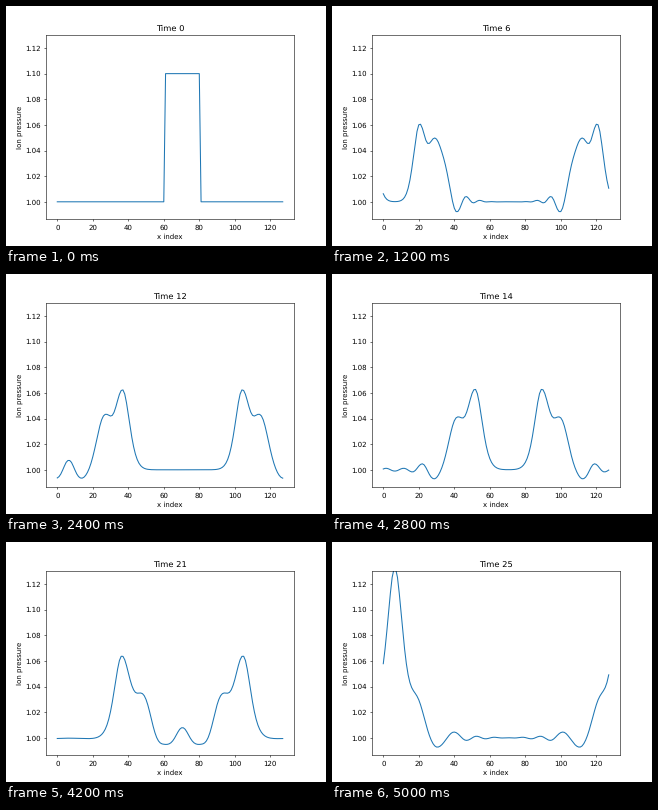
A matplotlib script that plays this animation: 320x240 px, repeating every 5.2 s.

```python
import numpy as np
import matplotlib.pyplot as plt
from matplotlib.animation import FuncAnimation

CELLS = 128
FRAMES = 26
STEPS = 20             # time steps per frame
GAMMA = 5 / 3
SOUND = 7.44           # sound speed, cells per frame
SCALE = SOUND / np.sqrt(GAMMA)
DAMPING = 0.6          # strength of the Lax flux


def right(f):
    return np.roll(f, -1)


def left(f):
    return np.roll(f, 1)


def slope(f):
    """Monotonised-central limited slope."""
    back, ahead = f - left(f), right(f) - f
    size = np.minimum(2 * np.minimum(abs(back), abs(ahead)),
                      0.5 * abs(back + ahead))
    return np.where(back * ahead > 0, np.sign(back) * size, 0)


def gradient(f):
    return 0.5 * (right(f) - left(f))


def advect(f, v, wave):
    """Divergence of f*v with a Lax flux at the cell faces."""
    half = 0.5 * slope(f)
    v_face = 0.5 * (v + right(v))
    w_face = np.maximum(wave, right(wave))
    flux = 0.5 * ((f + half) * (v_face + w_face)
                  + right(f - half) * (v_face - w_face))
    return flux - left(flux)


def rates(state):
    n, m, p = state
    v = m / n
    wave = DAMPING * np.sqrt(p / n)
    return -SCALE * np.array([
        advect(n, v, wave),
        advect(m, v, wave) + gradient(p),
        advect(p, v, wave) + (GAMMA - 1) * p * gradient(v),
    ])


def advance(state, dt):
    k1 = rates(state)
    k2 = rates(state + dt / 2 * k1)
    k3 = rates(state + dt / 2 * k2)
    k4 = rates(state + dt * k3)
    return state + dt / 6 * (k1 + 2 * k2 + 2 * k3 + k4)


def simulate():
    x = np.arange(CELLS)
    pressure = np.where((x > 60) & (x <= 80), 1.1, 1.0)
    state = np.array([np.ones(CELLS), np.zeros(CELLS), pressure])
    history = [pressure]
    for _ in range(FRAMES - 1):
        for _ in range(STEPS):
            state = advance(state, 1 / STEPS)
        history.append(state[2])
    return history


history = simulate()

plt.rcParams["text.hinting"] = "none"
fig, ax = plt.subplots(figsize=(6.4, 4.8), dpi=50)
fig.subplots_adjust(bottom=0.111)
line, = ax.plot(history[0])
ax.set_ylim(0.9863, 1.1303)
ax.set_xlabel("x index")
ax.set_ylabel("Ion pressure")
title = ax.set_title("Time 0")


def draw(i):
    line.set_ydata(history[i])
    title.set_text(f"Time {i}")
    return line, title


anim = FuncAnimation(fig, draw, frames=FRAMES, interval=200,
                     repeat=True, repeat_delay=0, blit=False)
plt.show()
```
